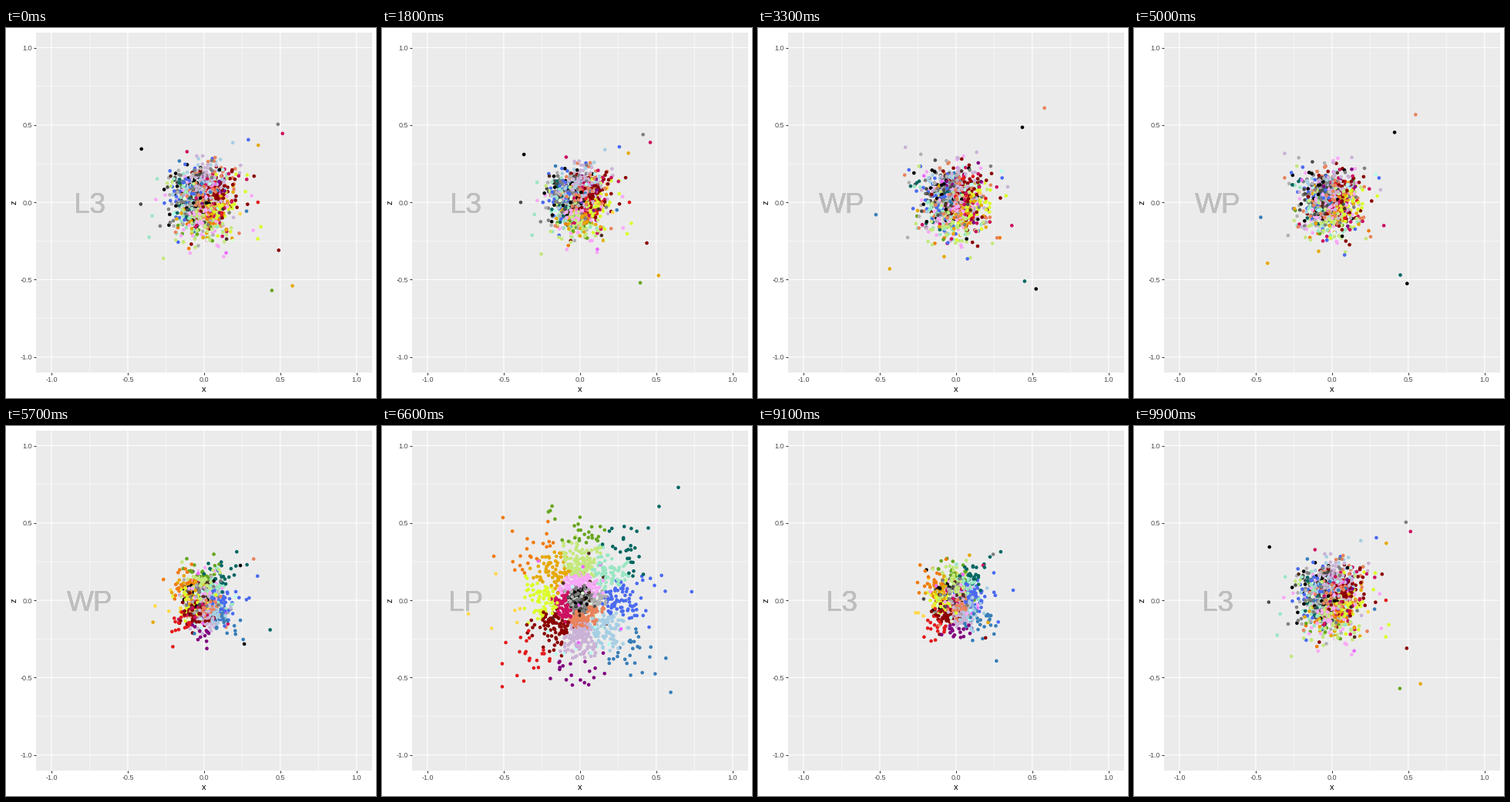
Write a matplotlib script that moves like this. It is 480 px wide and 480 px high and loops after 10 s.

```python
import matplotlib.pyplot as plt
import numpy as np
from matplotlib.animation import FuncAnimation

SIZE, FRAMES, COUNT = 480, 100, 1600
rng = np.random.default_rng(12)
plt.rcParams["font.family"] = "Liberation Sans"

BLACK, COAL, GREY, SILVER = "#000000", "#4d4d4d", "#7f7f7f", "#b0b0b0"
PINK, VIOLET, CRIMSON, SALMON = "#f8a8f8", "#ee66ff", "#cc1060", "#e8835c"
GOLD, GREEN, WINE, TEAL = "#e6a800", "#66a61e", "#8b0000", "#006661"
STEEL, LILAC = "#377eb8", "#cab2d6"

# In LP, colour depends on ring and on the eighth of the circle,
# counted anticlockwise from the right.
CORE = [BLACK, BLACK, COAL, GREY, GREY, GREY, SILVER, SILVER]
RINGS = [
    [SILVER, PINK, PINK, PINK, CRIMSON, CRIMSON, SALMON, SALMON],
    ["#4a6af0", "#99e6c4", "#c4e87c", GOLD, "#dcfc2a", WINE, LILAC,
     "#a6cee3"],
    ["#4a6af0", TEAL, GREEN, "#f07a0a", "#ffd84a", "#e31a1c", "#810080",
     STEEL],
]
RARE = ["#4f2f22", "#e0ffd6", "#b4fff0", VIOLET]
RING_EDGES = (.085, .165, .39)
REACH = np.array([.06, .05, .085, .085])  # home distance per ring

# outermost points of each state
FAR_LP = [(.645, .73), (.595, -.595), (-.505, .535), (-.51, -.41),
          (-.565, .285), (-.195, .58)]
FAR_WP = [(SALMON, .58, .61), (BLACK, .435, .485), (BLACK, .525, -.56),
          (STEEL, -.525, -.08), (TEAL, .45, -.51), (GOLD, -.435, -.43)]
FAR_L3 = [(GOLD, .58, -.54), (GREEN, .445, -.57), (GREY, .485, .505),
          (CRIMSON, .515, .445), (WINE, .49, -.31), (BLACK, -.41, .345)]


def polar(r, angle):
    return np.column_stack([r * np.cos(angle), r * np.sin(angle)])


def cloud(shape, scale):
    """Round heap of points with longer tails along the diagonals."""
    u = rng.uniform(0, 2 * np.pi, COUNT)
    angle = u + .2 * np.sin(2 * u)
    r = scale * rng.weibull(shape, COUNT)
    return polar(r * (1 - .14 * np.cos(4 * angle)), angle)


def paint(xz):
    """Return the colours, rings and angles of points in LP."""
    angle = np.arctan2(xz[:, 1], xz[:, 0])
    ring = np.digitize(np.hypot(*xz.T), RING_EDGES)
    eighth = np.rint(angle / (np.pi / 4)).astype(int) % 8
    colors = np.where(ring == 0, rng.choice(CORE, COUNT),
                      np.array(RINGS)[ring - 1, eighth])
    rare = (ring < 3) & (rng.random(COUNT) < .04)
    return np.where(rare, rng.choice(RARE, COUNT), colors), ring, angle


def mixed(turn, far):
    """Heap in which every group drifts to the side opposite its LP place."""
    toward = np.where(ring == 0, np.radians(150), angle + np.radians(turn))
    xz = cloud(1.3, .1) + polar(REACH[ring], toward)
    for color, x, z in far:
        xz[rng.choice(np.flatnonzero(colors == color))] = x, z
    return xz


lp = cloud(1.7, .24)
lp[:len(FAR_LP)] = FAR_LP
colors, ring, angle = paint(lp)
lp[len(FAR_LP):] += rng.normal(0, .014, (COUNT - len(FAR_LP), 2))
states = [mixed(160, FAR_L3), mixed(168, FAR_WP), lp]

fig = plt.figure(figsize=(SIZE / 72, SIZE / 72), dpi=72, facecolor="white")
left, right, top, bottom = 39.2, 474.5, 5.5, 446.8
ax = fig.add_axes([left / SIZE, 1 - bottom / SIZE,
                   (right - left) / SIZE, (bottom - top) / SIZE],
                  facecolor="#ebebeb")
ax.spines[:].set_visible(False)
ax.set(xlim=(-1.1, 1.1), ylim=(-1.1, 1.1))
ax.set_axisbelow(True)
major = np.arange(-1, 1.1, .5)
for axis in (ax.xaxis, ax.yaxis):
    axis.set_ticks(major, [f"{v:.1f}" for v in major])
    axis.set_ticks(major[:-1] + .25, minor=True)
ax.grid(which="major", color="white", linewidth=1.07, snap=False)
ax.grid(which="minor", color="white", linewidth=.53, snap=False)
ax.tick_params(which="major", length=2.75, width=1.07, pad=2.2,
               color="#333333", labelcolor="#4d4d4d", labelsize=9)
ax.tick_params(which="minor", length=0)


def write(x, y, text, size, **kw):
    return fig.text(x / SIZE, 1 - y / SIZE, text, size=size, ha="center",
                    va="baseline", rotation_mode="anchor", **kw)


write(256.8, 472, "x", 11)
write(13.2, 226.2, "z", 11, rotation=90)
dots = ax.scatter(*states[0].T, s=4.6 ** 2, c=colors, linewidths=0, zorder=3)
# stacked copies harden the letter edges
labels = [write(108.3, 239.8, "L3", 37, color="#bebebe") for _ in range(6)]

NAMES = ("L3", "WP", "LP")
MOVES = ((16, 17), (49, 17), (83, 16))  # last still frame, steps


def draw(i):
    a, b, t = 0, 0, 0
    for k, (start, steps) in enumerate(MOVES):
        if i > start:
            a, b, t = k, (k + 1) % 3, min((i - start) / steps, 1)
    dots.set_offsets(states[a] * (1 - t) + states[b] * t)
    for label in labels:
        label.set_text(NAMES[b if t >= .5 else a])
    return [dots, *labels]


anim = FuncAnimation(fig, draw, frames=FRAMES, interval=100, repeat=True,
                     repeat_delay=0, blit=False)
plt.show()
```
